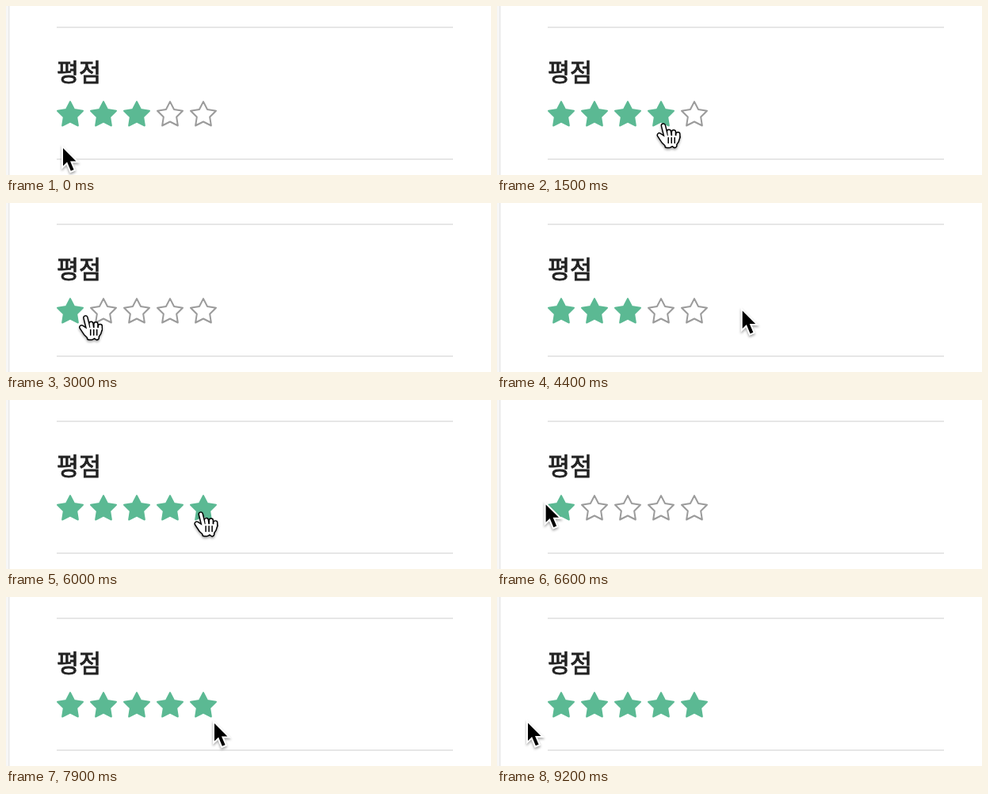
An HTML page that plays this animation: 612x214 px, repeating every 9810 ms.

```html
<!DOCTYPE html>
<html lang="ko">
<head>
<meta charset="utf-8">
<title>평점</title>
<style>
  html, body { margin: 0; width: 100%; height: 100%; overflow: hidden; background: #fff; }
  svg { display: block; }
  text {
    font: 500 30.5px "Noto Sans CJK KR", "Noto Sans CJK", sans-serif;
    fill: #222; stroke: #222; stroke-width: .8;
  }
  .star { fill: #fff; stroke: #9b9b9b; stroke-width: 2; stroke-linejoin: round; }
  .star.on { fill: #5bb993; stroke: #5bb993; }
  #cursor { filter: drop-shadow(0 2px 1.5px rgba(0, 0, 0, .35)); }
  #arrow { stroke: #fff; stroke-width: 4; stroke-miterlimit: 10; paint-order: stroke; }
  #hand { fill: #fff; stroke-linecap: round; stroke-linejoin: round; }
</style>
</head>
<body>
<svg width="612" height="214" viewBox="0 0 612 214">
  <defs>
    <g id="glove">
      <path d="M-4.7 15 .6 23 4.9 27.2V28.4H8L11.9 26.2 14.8 28.4V26.2L17.4 22.2 18.8 17.5H4L3 20Z"/>
      <path d="M.4 3 4 17.5M7.4 10.5 8.4 17.5M13.4 11V17.5M18.8 13.8V17.5"/>
    </g>
  </defs>
  <rect width="3" height="214" fill="#f6f6f6"/>
  <rect x="3" width="1.5" height="214" fill="#e8e8e8"/>
  <path d="M64 27H564M64 194H564" stroke="#e6e6e6" stroke-width="2"/>
  <text x="64" y="95">평점</text>
  <g id="stars"></g>
  <g id="cursor">
    <path id="arrow" d="M0 0V22.4L5.1 17.5 9.8 28.8 13.6 27.2 9 16.4H16.4Z"/>
    <g id="hand">
      <use href="#glove" stroke="#000" stroke-width="6.5"/>
      <use href="#glove" stroke="#fff" stroke-width="3.6"/>
      <path d="M6.7 18.2v6.8m4 0v-6.8m4 0v6.8" fill="none" stroke="#000" stroke-width="1.5"/>
    </g>
  </g>
</svg>
<script>
const LOOP = 9810, STEP = 100;
const COUNT = 5, LEFT = 60, PITCH = 42;
const RATED_AT = 5300; // the click that raises the rating from 3 to 5

// Eased pointer moves; the pointer rests between them
const origin = { x: 72, y: 180 };
const moves = [
  { from: 0, to: 500, x: 220, y: 177 },
  { from: 900, to: 1500, x: 209.5, y: 148.5 },
  { from: 1800, to: 2800, x: 82, y: 142.3 },
  { from: 2900, to: 3000, x: 100, y: 142.3 },
  { from: 3000, to: 3800, x: 311, y: 136.5 },
  { from: 4350, to: 4900, x: 254, y: 142 },
  { from: 5900, to: 6700, x: 53, y: 132 },
  { from: 6700, to: 6900, x: 100, y: 132 },
  { from: 6900, to: 7600, x: 343, y: 131 },
  { from: 7700, to: 7900, x: 263, y: 160 },
  { from: 7900, to: 8600, x: 39, y: 170 },
  { from: 8800, to: 9200, x: 39, y: 159.5 }
];

const $ = id => document.getElementById(id);
const clamp = v => Math.min(1, Math.max(0, v));
const smooth = k => k * k * (3 - 2 * k);

const starPoints = cx => Array.from({ length: 10 }, (_, i) => {
  const r = i % 2 ? 8.6 : 16.8, a = i * Math.PI / 5;
  return [cx + r * Math.sin(a), 137.9 - r * Math.cos(a)].map(v => v.toFixed(2));
}).join(' ');

const stars = Array.from({ length: COUNT }, (_, i) => {
  const star = document.createElementNS('http://www.w3.org/2000/svg', 'polygon');
  star.setAttribute('points', starPoints(LEFT + PITCH / 2 + i * PITCH));
  return $('stars').appendChild(star);
});

function pointerAt(t) {
  return moves.reduce((p, m) => {
    const e = smooth(clamp((t - m.from) / (m.to - m.from)));
    return { x: p.x + (m.x - p.x) * e, y: p.y + (m.y - p.y) * e };
  }, origin);
}

function render(now) {
  const t = Math.floor(now % LOOP / STEP) * STEP;
  const { x, y } = pointerAt(t);
  const over = x >= LEFT && x < LEFT + COUNT * PITCH && y > 118 && y < 155;
  const rating = t < RATED_AT ? 3 : 5;
  const filled = over ? Math.floor((x - LEFT) / PITCH) + 1 : rating;
  const hand = over && x >= LEFT + 4;

  stars.forEach((s, i) => s.setAttribute('class', i < filled ? 'star on' : 'star'));
  $('cursor').setAttribute('transform', `translate(${x.toFixed(1)} ${y.toFixed(1)})`);
  $('hand').style.display = hand ? '' : 'none';
  $('arrow').style.display = hand ? 'none' : '';
}

const start = performance.now();
function tick() {
  render(performance.now() - start);
  requestAnimationFrame(tick);
}
tick();
</script>
</body>
</html>
```
